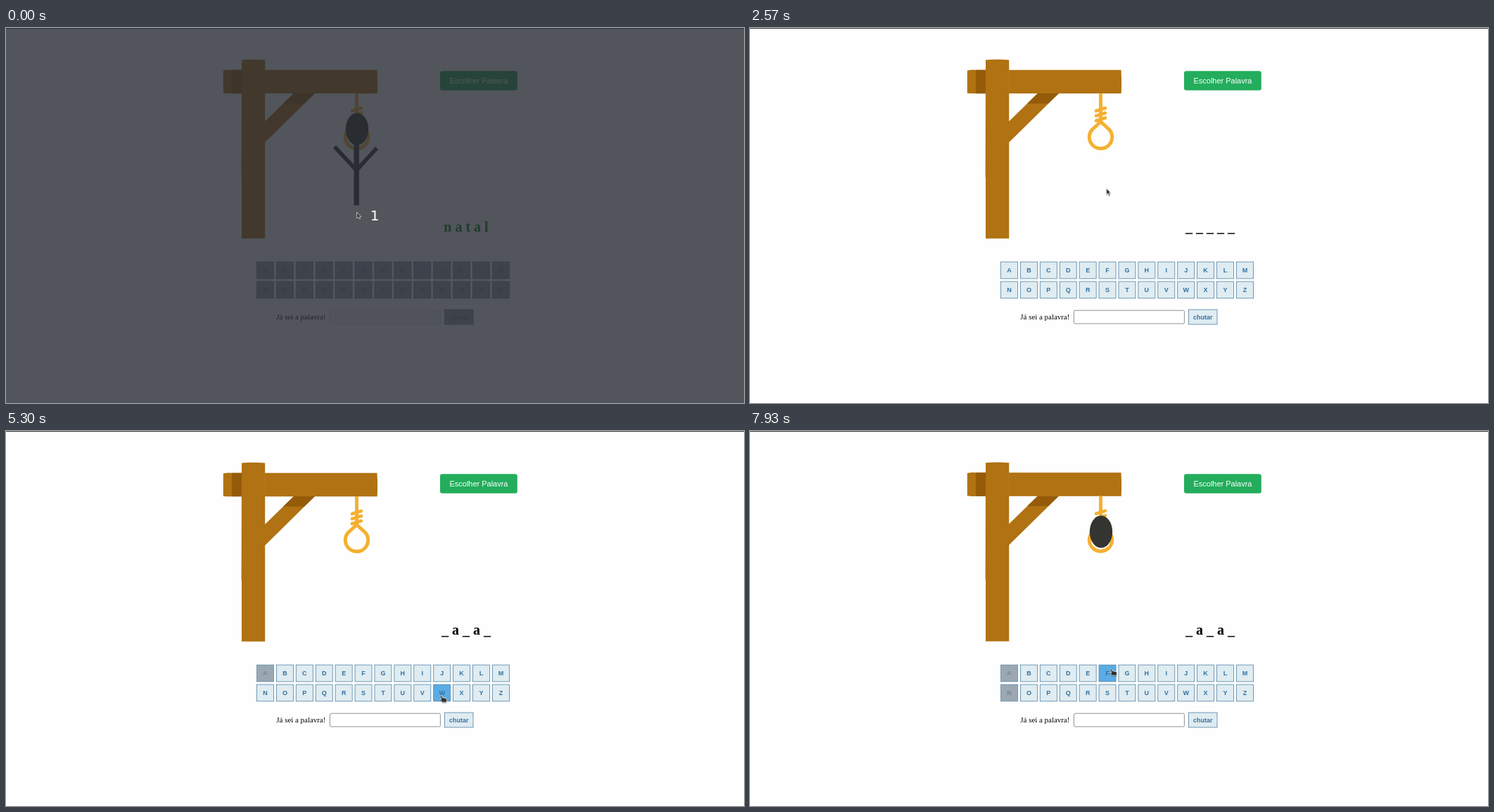
These frames come from a looping animation (1049 by 534 pixels, 8 s). An HTML page:

```html
<!DOCTYPE html>
<html lang="pt">
<head>
<meta charset="utf-8">
<title>Forca</title>
<style>
  html, body { margin: 0; width: 100%; height: 100%; overflow: hidden; background: #fefefe; }
  svg { display: block; width: 100%; height: 100%; }
  text { text-anchor: middle; font-family: "Liberation Sans", Arial, sans-serif; }
  .serif { font-family: "Liberation Serif", "Times New Roman", serif; }
  .key rect { fill: #dfecf1; stroke: #4f83a6; stroke-width: .8; }
  .key text { fill: #35709f; font-size: 9px; font-weight: bold; }
  .key.hover rect { fill: #5aace4; }
  .key.off rect { fill: #9ba8b1; stroke: #5d8bad; }
  .key.off text { fill: #7a858d; }
  #word { font-size: 20px; font-weight: bold; white-space: pre; }
  #input { fill: #fff; stroke: #767676; stroke-width: .8; }
  #input.off { fill: #f8f8f8; stroke: #cfcfcf; }
  .wood { fill: #b07212; }
  .shade { fill: #965b08; }
  .rope { fill: none; stroke: #f5b031; stroke-width: 5; }
  .limb { fill: none; stroke: #333; }
  .cursor { fill: #2f2f2f; stroke: #fff; stroke-width: .7; filter: drop-shadow(0 1px .6px #0006); }
</style>
</head>
<body>
<svg viewBox="0 0 1049 534">
  <rect width="1049" height="534" fill="#fefefe"/>
  <rect width="1049" height="1" fill="#363636"/>

  <g id="gallows">
    <path class="wood" d="M308.8 60.5Q315 59 321 59.7H527.5Q528.5 76 527.7 93.2H321Q315 93.5 308.8 92.7Z"/>
    <path class="shade" d="M321 59.7H335V93.2H321Z"/>
    <path class="wood" d="M368 133L409 93H439L368 163Z"/>
    <path class="shade" d="M394 107.5L409 93H439L424 107.5Z"/>
    <path class="wood" d="M335 45.6Q351 44 368.2 45.6V299.8H335V214L334.6 212Z"/>
    <path d="M368.2 60V93" stroke="#bd8430" stroke-width=".5"/>
    <g class="rope">
      <path d="M498.5 93V133"/>
      <path d="M498.5 133.5L486.5 144.5A16.2 16.2 0 1 0 510.5 144.5Z"/>
      <path d="M492 118l13-4m-13 11l13-4m-13 11l13-4" stroke-width="4.6" stroke-linecap="round"/>
    </g>
    <g id="body" class="limb">
      <path d="M498.2 160V252.5" stroke-width="7.4"/>
      <path d="M467 169L498.2 202.5L527 171" stroke-width="5.6"/>
    </g>
    <ellipse id="head" cx="499" cy="144" rx="16.2" ry="23" fill="#343531"/>
  </g>

  <rect x="617" y="61.3" width="109.8" height="27.4" rx="3" fill="#23ad5c"/>
  <text x="672" y="79" font-size="10.97" fill="#fff">Escolher Palavra</text>
  <text id="word" class="serif" x="654" y="290"></text>
  <g id="keys"></g>
  <text class="serif" x="384.3" y="415.3" font-size="10.93" style="text-anchor:start">Já sei a palavra!</text>
  <rect id="input" x="460.4" y="402.2" width="157" height="18.8" rx="1.5"/>

  <g id="dim">
    <rect width="1049" height="534" fill="rgb(39,43,50)" opacity=".8"/>
    <text x="524" y="274" font-size="20" fill="#fff" style="font-family:'DejaVu Sans',sans-serif">1</text>
  </g>
  <path id="arrow" class="cursor" d="M.7 .5V9.2L2.7 7.5L4.2 10.5L5.7 9.8L4.3 6.8H6.8Z"/>
  <path id="hand" class="cursor" d="M1 1.6C1 .3 2.6 .2 3 1.2L4.3 3.7L9 4.6Q10.5 5 10.5 6.6L10 10.3H4.8L.8 7.2Q.5 5.8 2 5.9L3 6.3Z"/>
</svg>
<script>
const $ = id => document.getElementById(id);
const LOOP = 8000, START = 1500, PICK_A = 3670, PICK_N = 7070;
const HOVER_LAG = 130;

// Pointer stops: arrival time, x, y, pause
const stops = [
  [0, 498, 262, 300], [620, 400, 371], [1100, 662, 98], [1230, 667, 80, 260],
  [START, 662, 89], [2300, 641, 117], [2900, 335, 364], [3130, 398, 364],
  [3400, 374, 347, 470], [4070, 520, 300], [4300, 684, 340], [4630, 498, 389, 300],
  [5200, 616, 376, 100], [5650, 676, 362, 150], [6200, 527, 363], [6600, 335, 372],
  [6870, 365, 371, 500], [7900, 511, 338, 100]
];
const knots = stops.flatMap(([t, x, y, pause]) =>
  pause ? [[t, x, y], [t + pause, x, y]] : [[t, x, y]]);

const slope = (i, axis) => knots[i + 1]
  ? (knots[i + 1][axis] - knots[i][axis]) / (knots[i + 1][0] - knots[i][0]) : 0;

// Tangent that never overshoots: zero at turns and pauses
function tangent(i, axis) {
  const a = i ? slope(i - 1, axis) : 0, b = slope(i, axis);
  return a * b > 0 ? 2 * a * b / (a + b) : 0;
}

function pointer(t) {
  const i = knots.findLastIndex(k => k[0] <= t), from = knots[i], to = knots[i + 1];
  if (!to) return from.slice(1);
  const span = to[0] - from[0], k = (t - from[0]) / span;
  return [1, 2].map(axis =>
    from[axis] + (to[axis] - from[axis]) * k * k * (3 - 2 * k) +
    span * k * (1 - k) * ((1 - k) * tangent(i, axis) - k * tangent(i + 1, axis)));
}

function addKey(label, x, y, w, h) {
  $("keys").insertAdjacentHTML("beforeend",
    `<g class="key"><rect x="${x}" y="${y}" width="${w}" height="${h}"/>` +
    `<text x="${x + w / 2}" y="${y + h / 2 + 3}">${label}</text></g>`);
  return { label, x, y, w, h, el: $("keys").lastChild };
}

const keys = [..."ABCDEFGHIJKLMNOPQRSTUVWXYZ"].map((c, i) =>
  addKey(c, 356.5 + i % 13 * 27.91, i < 13 ? 333.1 : 361, 24, 23.8));
keys.push(addKey("chutar", 623.5, 401, 40.5, 21));

const isOff = (key, t) =>
  t < START || key.label == "A" && t >= PICK_A || key.label == "N" && t >= PICK_N;

function keyAt([px, py], t) {
  const x = px + 2, y = py + 1;
  return keys.find(k => !isOff(k, t) && x >= k.x && x <= k.x + k.w && y >= k.y && y <= k.y + k.h);
}

const show = (id, on) => $(id).style.display = on ? "" : "none";

function draw(t) {
  const pos = pointer(t), [x, y] = pos;
  const hovered = keyAt(pointer(Math.max(0, t - HOVER_LAG)), t);
  for (const k of keys)
    k.el.setAttribute("class", "key" + (isOff(k, t) ? " off" : k == hovered ? " hover" : ""));

  $("word").textContent = t < START ? "n a t a l" : t < PICK_A ? "_ _ _ _ _" : "_ a _ a _";
  $("word").setAttribute("fill", t < START ? "#008000" : "#000");
  $("input").setAttribute("class", t < START ? "off" : "");

  const full = t < START + 70, hit = t >= PICK_N + 60;
  show("body", full);
  show("head", full || hit);
  $("gallows").setAttribute("transform", `translate(0 ${hit ? -.4 : 0})`);
  show("dim", t < 30);

  const onButton = x > 615 && x < 725 && y > 60 && y < 91;
  const pointing = onButton || !!keyAt(pos, t);
  show("hand", pointing);
  show("arrow", !pointing);
  $(pointing ? "hand" : "arrow").setAttribute("transform", `translate(${x} ${y})`);
}

const begin = performance.now();
function tick() {
  draw((performance.now() - begin) % LOOP);
  requestAnimationFrame(tick);
}
tick();
</script>
</body>
</html>
```
